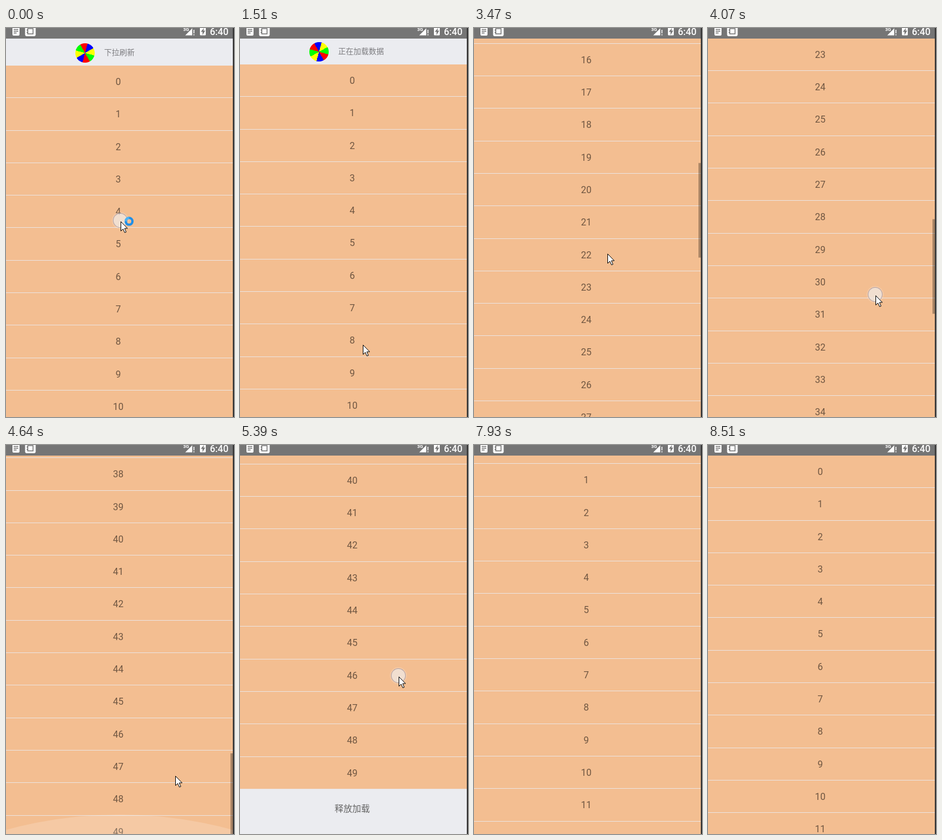
Write an HTML page that moves like this. It is 388 px wide and 662 px high and loops after 8920 ms.

```html
<!DOCTYPE html>
<html lang="zh-CN">
<head>
<meta charset="utf-8">
<title>Pull to refresh list</title>
<style>
html, body { margin: 0; width: 100%; height: 100%; overflow: hidden; }
body { background: #ebecf0; font-family: Roboto, "Noto Sans CJK SC", "Noto Sans CJK", sans-serif; }
#stage { position: relative; width: 388px; height: 662px; overflow: hidden; background: #ebecf0; }
#stage > * { position: absolute; }
#list { left: 0; top: 18px; width: 386px; text-align: center; }
.row { box-sizing: border-box; height: 55.3px; padding-right: 4px; border-bottom: 1px solid #ece3df;
  font-size: 16px; line-height: 56.6px; color: #6f5641; background: #f3be91; }
#wheel, #tip { position: absolute; }
#wheel { left: 118px; top: -38px; width: 33px; height: 33px; border-radius: 50%;
  background: repeating-conic-gradient(from -30deg, red 0 45deg, blue 0 90deg, yellow 0 135deg, lime 0 180deg); }
#tip { left: 167px; top: -32px; font-size: 13px; line-height: 20px; color: #7d7d80; white-space: nowrap; }
#more { padding-right: 4px; font-size: 15px; line-height: 66px; color: #666; }
#bar { left: 382px; top: 18px; width: 4px; height: 161px; background: rgba(0, 0, 0, .3); }
#glow { left: -536px; top: 629px; width: 1458px; height: 1458px; border-radius: 50%; background: rgba(255, 255, 255, .17); }
#status { left: 0; top: 0; background: #757575; }
#edge { left: 386px; top: 0; width: 2px; height: 662px; background: #333; }
#touch { left: -13px; top: -14px; width: 23px; height: 23px; border-radius: 50%; background: rgba(240, 234, 230, .75);
  border: 1.5px solid rgba(140, 130, 150, .65); box-shadow: 0 0 0 2px rgba(255, 255, 255, .15); }
#pointer { left: 0; top: 0; overflow: visible; }
</style>
</head>
<body>
<div id="stage">
  <div id="list">
    <div id="wheel"></div>
    <div id="tip"></div>
    <div id="more"></div>
  </div>
  <div id="glow"></div>
  <div id="bar"></div>
  <svg id="status" width="386" height="18" fill="#fff">
    <path d="M11 0h12v11q0 2-2 2h-8q-2 0-2-2z"/>
    <path d="M13 2.5h8M13 5.5h8M13 8.5h5" stroke="#757575" stroke-width="1.3"/>
    <rect x="32.5" y="-5" width="18" height="19" rx="3"/>
    <path d="M37 1h9v9h-9zM35 3.5h3M35 7.5h3" fill="none" stroke="#757575" stroke-width="1.5"/>
    <text x="301.5" y="4.5" font-size="8" font-weight="700">3G</text>
    <path d="M305 12.5L317 .5V12.5zM319 3h1.5v6H319zM319 10.5h1.5v2H319z"/>
    <path d="M330 0h10v11q0 1.500-1.500 1.500h-7q-1.500 0-1.500-1.500z"/>
    <path d="M337 0L331.500 6.500H334.500V12L339 4.500H336z" fill="#757575"/>
    <text x="347" y="11.5" font-size="16" font-weight="500">6:40</text>
  </svg>
  <div id="edge"></div>
  <div id="touch"></div>
  <svg id="pointer" width="24" height="24">
    <path d="M.5.5V16.500L4.200 13L7 19.200L9.500 18.200L6.800 12H11.700Z" fill="#fff" stroke="#000" stroke-linejoin="round"/>
    <g id="busy" fill="none" stroke-width="4">
      <circle cx="14.5" cy="0" r="5.7" stroke="#1f8fe8"/>
      <path d="M8.800 0a5.700 5.700 0 0 1 5.700-5.700" stroke="#4cb4f5"/>
    </g>
  </svg>
</div>
<script>
const LOOP = 8920, ROWS = 50, CONTENT = ROWS * 55.3, VIEW = 668, END = CONTENT - VIEW;
const HEADER = 43.5, FOOTER = 64;
const RELEASE = 1105, LOADED = 2470, FLING = 2740, FLING2 = 3830, PULL_UP = 4880, LET_GO = 5820, RESET = 7930;

const $ = id => document.getElementById(id);
const [list, wheel, tip, more, bar, glow, touch, pointer, busy] =
  ['list', 'wheel', 'tip', 'more', 'bar', 'glow', 'touch', 'pointer', 'busy'].map($);

for (let i = 0; i < ROWS; i++) {
  const row = document.createElement('div');
  row.className = 'row';
  row.textContent = i;
  list.insertBefore(row, more);
}

const phase = (t, a, b) => Math.min(1, Math.max(0, (t - a) / (b - a)));
const smooth = (t, a, b) => { const p = phase(t, a, b); return p * p * (3 - 2 * p); };
const slow = (t, a, b) => 1 - (1 - phase(t, a, b)) ** 2;
const within = (t, a, b) => t >= a && t < b;

// Pointer stops: time, x, y
const stops = [[0, 195, 329], [970, 206, 612], [1510, 209, 539], [FLING, 209, 539], [3470, 227, 384],
  [FLING2, 285, 590], [4235, 285, 380], [4640, 288, 563], [PULL_UP, 286, 594], [5390, 270, 394],
  [LET_GO, 270, 394], [6550, 311, 611], [7270, 390, 664]];

function pointerAt(t) {
  const i = Math.max(1, stops.findIndex(s => s[0] > t));
  const [t0, x0, y0] = stops[i - 1], [t1, x1, y1] = stops[i], p = smooth(t, t0, t1);
  return [x0 + (x1 - x0) * p, y0 + (y1 - y0) * p];
}

// Dragging past either end moves the list by half the finger's way
function scrollAt(t, y) {
  const first = 933 * slow(t, FLING, 3710);
  if (t < RELEASE) return -45.5 - (y - 329) / 2;
  if (t < FLING) return -HEADER;
  if (t < FLING2) return first;
  if (t < PULL_UP) return first + (END - first) * smooth(t, FLING2, 4505);
  if (t < LET_GO) return END + (594 - y) / 2;
  if (t < RESET) return END + FOOTER + (100 - FOOTER) * (1 - slow(t, LET_GO, 6100));
  return 41.5 * (1 - slow(t, 8100, 8510));
}

const show = (el, on) => { el.style.visibility = on ? 'visible' : 'hidden'; };
const label = (el, text) => { if (el.textContent !== text) el.textContent = text; };

function draw(t) {
  const [x, y] = pointerAt(t), s = scrollAt(t, y);
  list.style.transform = `translateY(${Math.round(-s)}px)`;
  wheel.style.transform = `rotate(${within(t, RELEASE, FLING) ? (t - 1110) * 135 / 400 : 0}deg)`;
  label(tip, t < RELEASE ? (s < -1.5 * HEADER ? '释放刷新' : '下拉刷新') : t < LOADED ? '正在加载数据' : '刷新完成');
  label(more, t >= LET_GO ? '正在拼命加载数据…' : s > END + FOOTER ? '释放加载' : '上拉加载');

  bar.style.transform = `translateY(${s / CONTENT * VIEW}px)`;
  show(bar, within(t, FLING, PULL_UP));
  glow.style.opacity = phase(t, 4370, 4505) * (1 - phase(t, 4640, PULL_UP));

  pointer.style.transform = touch.style.transform = `translate(${Math.round(x)}px, ${Math.round(y)}px)`;
  show(pointer, t < 7270);
  show(busy, t < 240);
  show(touch, t < 1000 || within(t, FLING, 3030) || within(t, FLING2, 4235) || within(t, PULL_UP, LET_GO));
}

const start = performance.now();
function frame() {
  draw((performance.now() - start) % LOOP);
  requestAnimationFrame(frame);
}
frame();
</script>
</body>
</html>
```
